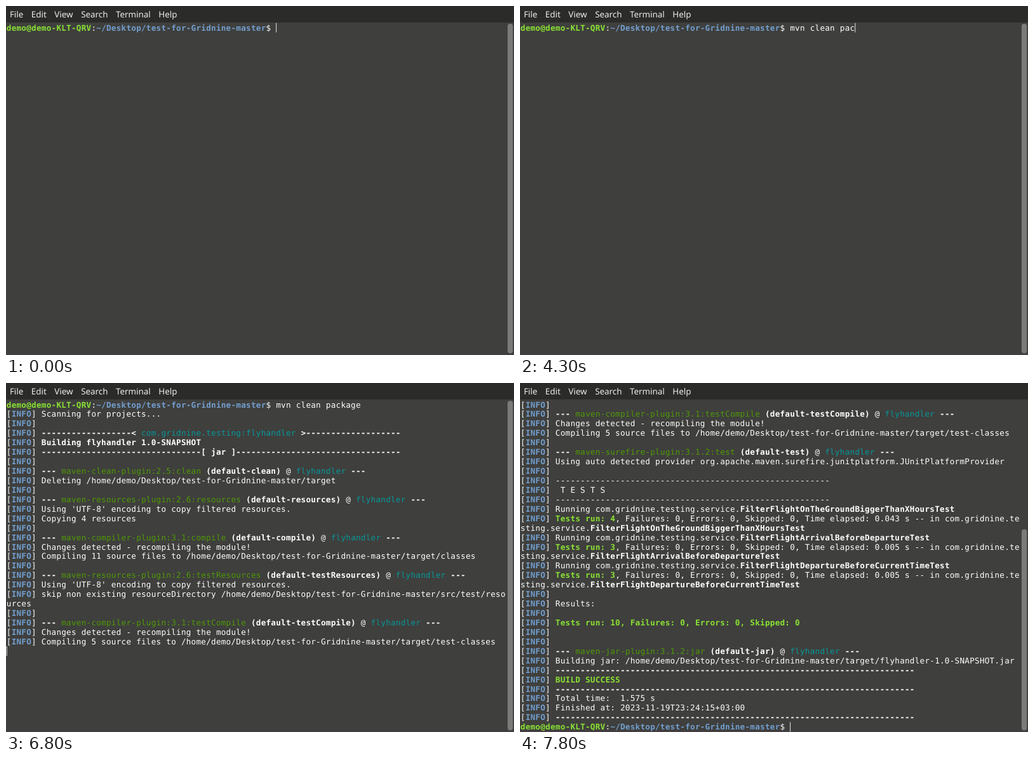
An HTML page with a canvas for the animation above (8000 ms loop, 800x550 px).

```html
<!DOCTYPE html>
<html lang="en">
<head>
<meta charset="utf-8">
<title>Terminal build</title>
<style>
  html, body { margin: 0; width: 100%; height: 100%; overflow: hidden; background: #3f3f3d; }
  canvas { display: block; }
</style>
</head>
<body>
<canvas id="stage" width="800" height="550"></canvas>
<script>
const ctx = document.getElementById('stage').getContext('2d');
const LOOP = 8000, SCALE = 0.786, CELL_W = 10, CELL_H = 19, LEFT = 1, TOP = 34;
const COLS = 100, VISIBLE = 35;
const MONO = '16px "DejaVu Sans Mono", monospace';

// Style letter -> [colour, weight]; text marks a style change with "|" and its letter.
const STYLES = {
  w: ['#ffffff', ''], b: ['#ffffff', 'bold '], i: ['#729fcf', 'bold '],
  g: ['#4e9a06', ''], c: ['#06989a', ''], l: ['#8ae234', 'bold ']
};

const PROJECT = 'Desktop/test-for-Gridnine-master';
const HOME = '/home/demo/' + PROJECT;
const PROMPT = `|ldemo@demo-KLT-QRV|w:|i~/${PROJECT}|w$ `;
const PROMPT_COLS = 54;
const COMMAND = 'mvn clean package ';

const dash = n => '-'.repeat(n);
const info = (text = '') => `|w[|iINFO|w] ${text}`;
const plugin = (name, id) =>
  [info(), info(`|b--- |g${name}|b (${id})|w @ |cflyhandler|b ---`)];
const test = (name, count, time) => {
  const path = `com.gridnine.testing.service.|b${name}`;
  return [
    info('Running ' + path),
    info(`|lTests run: ${count}|w, Failures: 0, Errors: 0, Skipped: 0, Time elapsed: ${time} s -- in ${path}`)
  ];
};
const encoding = info("Using 'UTF-8' encoding to copy filtered resources.");
const changes = info('Changes detected - recompiling the module!');
const rule = info('|b' + dash(72)), testRule = info(dash(55));

const log = [
  info('Scanning for projects...'),
  info(),
  info(`|b${dash(18)}< |ccom.gridnine.testing:flyhandler|b >${dash(19)}`),
  info('|bBuilding flyhandler 1.0-SNAPSHOT'),
  info(`|b${dash(32)}[ jar ]${dash(33)}`),
  ...plugin('maven-clean-plugin:2.5:clean', 'default-clean'),
  info(`Deleting ${HOME}/target`),
  ...plugin('maven-resources-plugin:2.6:resources', 'default-resources'),
  encoding,
  info('Copying 4 resources'),
  ...plugin('maven-compiler-plugin:3.1:compile', 'default-compile'),
  changes,
  info(`Compiling 11 source files to ${HOME}/target/classes`),
  ...plugin('maven-resources-plugin:2.6:testResources', 'default-testResources'),
  encoding,
  info(`skip non existing resourceDirectory ${HOME}/src/test/resources`),
  ...plugin('maven-compiler-plugin:3.1:testCompile', 'default-testCompile'),
  changes,
  info(`Compiling 5 source files to ${HOME}/target/test-classes`),
  ...plugin('maven-surefire-plugin:3.1.2:test', 'default-test'),
  info('Using auto detected provider org.apache.maven.surefire.junitplatform.JUnitPlatformProvider'),
  info(), testRule, info(' T E S T S'), testRule,
  ...test('FilterFlightOnTheGroundBiggerThanXHoursTest', 4, '0.043'),
  ...test('FilterFlightArrivalBeforeDepartureTest', 3, '0.005'),
  ...test('FilterFlightDepartureBeforeCurrentTimeTest', 3, '0.005'),
  info(), info('Results:'), info(),
  info('|lTests run: 10, Failures: 0, Errors: 0, Skipped: 0'),
  info(),
  ...plugin('maven-jar-plugin:3.1.2:jar', 'default-jar'),
  info(`Building jar: ${HOME}/target/flyhandler-1.0-SNAPSHOT.jar`),
  rule, info('|lBUILD SUCCESS'), rule,
  info('Total time:  1.575 s'),
  info('Finished at: 2023-11-19T23:24:15+03:00'),
  rule,
  PROMPT
];

// Splits a marked line into screen rows of {col, style, text} spans.
function wrap(line) {
  const rows = [[]];
  let col = 0;
  for (const part of line.split('|').slice(1)) {
    let text = part.slice(1);
    while (text) {
      if (col === COLS) { rows.push([]); col = 0; }
      const piece = text.slice(0, COLS - col);
      rows.at(-1).push({ col, style: part[0], text: piece });
      col += piece.length;
      text = text.slice(piece.length);
    }
  }
  return rows;
}
const output = log.flatMap(wrap);

// [time, value] steps
const typed = [[0, 0], [1000, 1], [1500, 3], [1700, 4], [1900, 5], [2300, 6], [2500, 7], [2700, 9],
  [3100, 10], [3700, 11], [3900, 12], [4300, 13], [4800, 14], [4900, 18]];
const printed = [[0, 0], [5500, 1], [6000, 2], [6100, 7], [6200, 13], [6300, 17], [6800, 26], [6900, 28],
  [7100, 29], [7200, 33], [7300, 42], [7400, 49], [7500, 50], [7600, 57]];
const caretOn = [[0, 1], [300, 0], [900, 1], [6100, 0], [6600, 1], [7200, 0], [7800, 1]];
const at = (steps, t) => steps.findLast(([time]) => time <= t)[1];

function rect(x, y, w, h, colour) {
  ctx.fillStyle = colour;
  ctx.fillRect(x, y, w, h);
}

function drawMenu() {
  rect(0, 0, 1020, 33, '#2b2b29');
  ctx.font = '17px "Noto Sans", sans-serif';
  ctx.letterSpacing = '0px';
  ctx.fillStyle = '#eeeeec';
  let x = 7.5;
  for (const item of ['File', 'Edit', 'View', 'Search', 'Terminal', 'Help']) {
    ctx.fillText(item, x, 22.9);
    x += ctx.measureText(item).width + 16;
  }
}

function drawRow(spans, row) {
  for (const { col, style, text } of spans) {
    const [colour, weight] = STYLES[style];
    ctx.font = weight + MONO;
    ctx.fillStyle = colour;
    ctx.fillText(text, LEFT + col * CELL_W, TOP + row * CELL_H + 15);
  }
}

function drawScrollbar(total) {
  const height = Math.min(661, 656.5 * VISIBLE / total);
  ctx.fillStyle = '#7b7b79';
  ctx.beginPath();
  ctx.roundRect(1005, 696.5 - height, 10.5, height, 5.2);
  ctx.fill();
}

function draw(t) {
  ctx.setTransform(SCALE, 0, 0, SCALE, 0, 0);
  ctx.textRendering = 'geometricPrecision';
  rect(0, 0, 1020, 702, '#3f3f3d');
  rect(0, 698, 1020, 4, '#473f47');
  drawMenu();

  const lines = at(printed, t);
  const screen = [wrap(PROMPT + COMMAND.slice(0, at(typed, t)))[0], ...output.slice(0, Math.max(0, lines - 1))];
  const finished = lines > output.length - 1;
  if (finished) screen[lines - 1] = output.at(-1);
  const atPrompt = lines === 0 || screen.length > output.length || lines === 57;
  const caretRow = lines === 0 ? 0 : lines === 57 ? 56 : lines;
  const caretCol = !atPrompt ? 0 : PROMPT_COLS + (lines ? 0 : at(typed, t));
  if (lines === 57) screen[56] = output.at(-1);

  const total = caretRow + 1, offset = Math.max(0, total - VISIBLE);
  ctx.letterSpacing = '0.367px';
  screen.slice(offset).forEach(drawRow);
  if (at(caretOn, t)) {
    rect(LEFT + caretCol * CELL_W, TOP + (caretRow - offset) * CELL_H, 1.1, CELL_H, '#ffffff');
  }
  drawScrollbar(total);
}

function tick(now) {
  draw(now % LOOP);
  requestAnimationFrame(tick);
}
requestAnimationFrame(tick);
</script>
</body>
</html>
```
